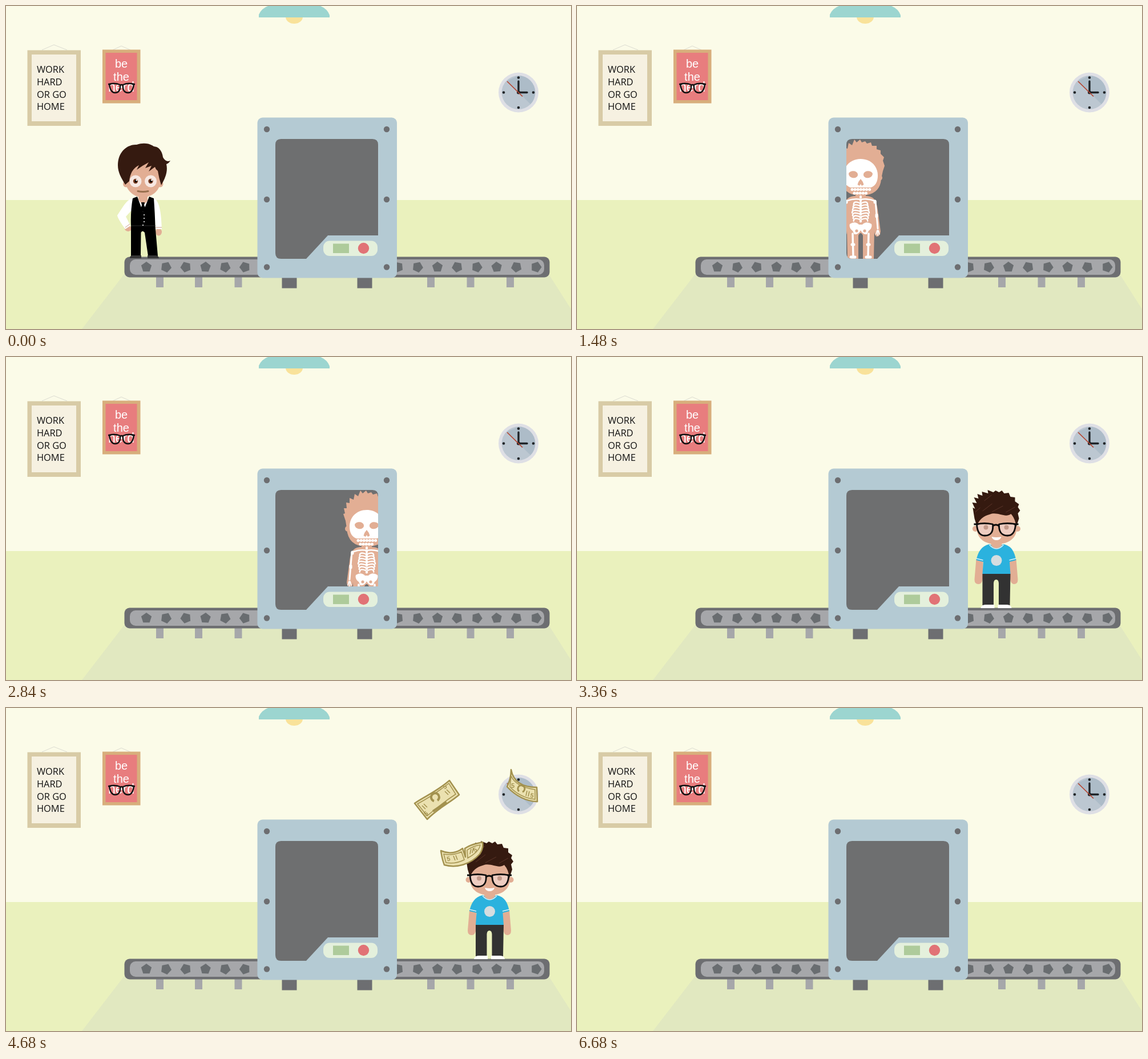
An HTML page that plays this animation: 990x566 px, repeating every 6.72 s.

```html
<!DOCTYPE html>
<html lang="en">
<head>
<meta charset="utf-8">
<title>Makeover machine</title>
<style>
html, body { margin: 0; width: 100%; height: 100%; overflow: hidden; background: #fbfbe8; }
svg { display: block; width: 990px; height: 566px; }
.motto { font: 16.4px "Open Sans", "Noto Sans", sans-serif; fill: #111; }
.nerdy { font: 20px "Liberation Sans", Arial, sans-serif; fill: #fff; text-anchor: middle; }
.skin { fill: #e2ae94; }
.bone { fill: #fff; }
.bones { fill: none; stroke: #fff; stroke-linecap: round; stroke-linejoin: round; }
.hair { fill: #351a10; }
.paper { fill: #ebe1b0; stroke: #a3924f; stroke-width: 2.5; stroke-linejoin: round; }
.ink { fill: none; stroke: #a3924f; stroke-width: 1.5; }
.five { font: bold 11px "Liberation Sans", Arial, sans-serif; fill: #a3924f; text-anchor: middle; }
</style>
</head>
<body>
<svg viewBox="0 0 990 566">
  <defs>
    <path id="pane" d="M482 233H642Q652 233 652 243V402H564L526 443H482Q472 443 472 433V243Q472 233 482 233Z"/>
    <clipPath id="window"><use href="#pane"/></clipPath>
  </defs>

  <!-- room -->
  <rect width="990" height="566" fill="#fbfbe8"/>
  <rect y="340" width="990" height="226" fill="#eaf1bd"/>
  <path d="M207 470H951L990 531V566H133Z" fill="#e1e8c0"/>
  <ellipse cx="505" cy="19" rx="15" ry="12" fill="#f9e29a"/>
  <path d="M443 20V15Q448 4 459 0H551Q563 5 567 16V20Z" fill="#9cd5d0"/>

  <!-- left picture -->
  <path d="M63 77L84 68L107 77" fill="none" stroke="#dcdcd2"/>
  <rect x="37.5" y="77.5" width="93.5" height="132.5" fill="#d8cba6"/>
  <rect x="45" y="85" width="78" height="117" fill="#f6f1e1"/>
  <g class="motto">
    <text x="54" y="117">WORK</text><text x="54" y="139">HARD</text>
    <text x="54" y="160.500">OR GO</text><text x="54" y="182">HOME</text>
  </g>

  <!-- right picture -->
  <path d="M187 77L202 70L218 77" fill="none" stroke="#dcdcd2"/>
  <rect x="169" y="76.500" width="66.500" height="94" fill="#d8ae7c"/>
  <rect x="174.500" y="82" width="55" height="83" fill="#e87d7e"/>
  <g class="nerdy">
    <text x="202" y="108">be</text><text x="202" y="131">the</text>
    <text x="202" y="150" font-size="23" style="font-size:23px">nerd</text>
  </g>
  <g fill="none" stroke="#111" stroke-width="2.4" stroke-linejoin="round">
    <path d="M181 137Q190 134 200 138Q201 152 191 152Q183 152 181 137ZM205 138Q214 134 224 137Q222 152 214 152Q204 152 205 138Z"/>
    <path d="M179 137H184M200 139Q202.500 137 205 139M221 137H226"/>
  </g>

  <!-- clock -->
  <circle cx="898" cy="151.500" r="35" fill="#dedfe5"/>
  <circle cx="898" cy="151.500" r="29.500" fill="#bcc7d1"/>
  <path d="M878 131L919 172A29.500 29.500 0 0 0 898 122Z" fill="#a9b8c6" opacity=".75"/>
  <g fill="#202428">
    <circle cx="898" cy="125.500" r="2.300"/><circle cx="924" cy="151.500" r="2.300"/>
    <circle cx="898" cy="178" r="2.300"/><circle cx="872" cy="151.500" r="2.300"/>
    <circle cx="898" cy="151.500" r="3"/>
  </g>
  <path d="M898 132V151.500H913" fill="none" stroke="#202428" stroke-width="3.400" stroke-linecap="round"/>
  <path d="M878 132L905 158.500" stroke="#b5442f" stroke-width="1.700"/>

  <!-- conveyor -->
  <path d="M263 475h13v18h-13zM331 475h13v18h-13zM400.500 475h13v18h-13zM738 475h13v18h-13zM807.500 475h13v18h-13zM877 475h13v18h-13z" fill="#a6a7aa"/>
  <rect x="207.500" y="439.500" width="745" height="36" rx="9" fill="#6d6e71"/>
  <rect x="217" y="444" width="726" height="27" rx="10" fill="#a6a7aa"/>
  <g id="rollers" fill="#696d70"></g>

  <!-- man in a waistcoat -->
  <g id="man">
    <g class="skin">
      <path d="M232 326H248V343L240 350L232 343Z"/>
      <ellipse cx="214" cy="390" rx="6" ry="5"/><ellipse cx="267.500" cy="396" rx="5.500" ry="6.500"/>
      <circle cx="210.500" cy="312" r="5.500"/><circle cx="270" cy="312" r="5.500"/>
      <path d="M209 290C209 256 271 256 271 290V307C269 325 255 335 240 335C225 335 211 325 209 307Z"/>
    </g>
    <path d="M229 335C213 335 206 351 195 367Q196 373 209 391L218 385L210 369L222 356V384H260V358L262 391H273C272 365 270 336 254 335L240 350Z" fill="#fff"/>
    <path d="M209 388L217 382M262 388H273" stroke="#c9a08d"/>
    <path d="M222 337L230 334L240 361L251 334L259 337Q261 365 261.500 386L266 438H249L243 397Q239 392 236.500 397L236 438H219V385Q218 360 222 337Z"/>
    <path d="M237 344H243L242 349L245 356L240 361L236 356L238 349Z"/>
    <path d="M219 385H262" stroke="#2c2c2c"/>
    <path d="M242 365V379M240 383V385" stroke="#ddd" stroke-width="1.800" stroke-dasharray="2 4"/>
    <path d="M217 442Q217 437 222 437H237V442ZM248 442V437H262Q267 437 268 442Z" fill="#353535"/>
    <path class="hair" d="M209 313C202 301 196 292 196 279C196 255 213 242 229 243C241 239 252 241 259 246C270 247 274 257 275 265C279 272 283 273 288 271Q285 276 281 277C284 290 279 302 272 314Q268 302 266 289Q262 286 261 282L250 290L255 280L244 284L250 274Q240 279 229 287L233 279Q218 286 216 307Z"/>
    <g fill="#f7e8e2"><circle cx="227" cy="307" r="10.500"/><circle cx="253.500" cy="307" r="10.500"/></g>
    <g fill="#743a20"><circle cx="227" cy="307" r="4.200"/><circle cx="253.500" cy="307" r="4.200"/></g>
    <circle cx="227.500" cy="307" r="2"/><circle cx="254" cy="307" r="2"/>
    <g fill="#fff"><circle cx="229" cy="305" r="1.500"/><circle cx="255.500" cy="305" r="1.500"/></g>
    <path d="M231 324.500Q240 326.500 249 324.500" fill="none" stroke="#98704f" stroke-width="3" stroke-linecap="round"/>
  </g>

  <!-- nerd -->
  <g id="nerd">
    <g class="skin">
      <path d="M784 354H796V385Q795 398 788 398Q781 398 781 390ZM842 354H854L857 390Q857 398 850 398Q844 398 843 385Z"/>
      <circle cx="782.500" cy="301" r="5"/><circle cx="856.500" cy="301" r="5"/>
      <path d="M784 280C786 258 852 258 855 280V301C854 320 838 328 819.500 328C801 328 786 320 785 301Z"/>
    </g>
    <path d="M807 328Q819.500 333 832 328C846 331 851 341 854 356L842.500 359L844 380H795L796.500 359L784 356C787 342 793 331 807 328Z" fill="#2bb2de"/>
    <path class="skin" d="M810 322H829V330Q819.500 341 810 330Z"/>
    <path d="M807 329Q819.500 343 832 329M784 353L796 356M842 356L854 353" fill="none" stroke="#d4eff8" stroke-width="1.600"/>
    <circle cx="819.500" cy="356.500" r="9.500" fill="#d5dde0"/>
    <path d="M795 380H844L843 435H823.500V396Q823 390 819 390Q815 390 814.500 396V435H795Z" fill="#323232"/>
    <path d="M792 440Q793 434 800 434H816V440ZM822 440V434H838Q845 434 846 440Z" fill="#fff"/>
    <path class="hair" d="M785 296L781 283L778 264L782 266L777 255L785 256L780 246L788 248L786 240L795 243L794 236L805 239L804 233L814 237L818 234L824 237L829 234L833 239L841 238L844 245L852 246L852 253L859 258L857 263L861 269L857 274L859 283L854 298Q853 284 845 275C834 283 822 270 807 276Q791 280 785 296Z"/>
    <path d="M782 272L791 264M795 270L812 257M812 271L831 261M836 272L852 263M798 252L811 242" stroke="#5b3428" stroke-width="1"/>
    <g fill="#eecdc1" stroke="#0c0c0c" stroke-width="2.800" stroke-linejoin="round">
      <path d="M785 293Q798 290 813 293Q815 313 799 313Q786 313 785 293ZM824 293Q839 290 853 293Q852 313 839 313Q823 313 824 293Z"/>
      <path d="M780 293H788M813 296Q818.500 292 824 296M850 293H858" fill="none"/>
    </g>
    <g fill="#c39a8a"><circle cx="801" cy="298.500" r="4"/><circle cx="837" cy="298.500" r="4"/></g>
    <path d="M811 315Q819.500 317 828 315Q826 321 819.500 321Q813 321 811 315Z" fill="#fff"/>
  </g>

  <!-- machine -->
  <path d="M483.500 470h26v24.500h-26zM615.500 470h26v24.500h-26z" fill="#6d6e71"/>
  <rect x="440.500" y="195.500" width="244.500" height="281" rx="9" fill="#b4cad3"/>
  <use href="#pane" fill="#6e6f70"/>
  <g id="bolts" fill="#6d6e71"></g>
  <rect x="556" y="411.500" width="95" height="26.500" rx="11" fill="#e4f0dc"/>
  <rect x="573" y="416.500" width="28" height="16.500" fill="#aecb9b"/>
  <circle cx="626.500" cy="424.500" r="9.700" fill="#e17376"/>

  <!-- x-ray view -->
  <g clip-path="url(#window)"><g id="xray">
    <g class="skin">
      <path d="M-35 300L-37 287L-41 275L-38 274L-40 265L-35 265L-36 255L-30 256L-30 247L-23 250L-21 240L-15 244L-11 234L-7 239L-1 234L2 239L8 237L11 241L18 239L20 245L28 245L28 251L35 253L35 259L41 265L39 271L42 280L39 289L36 303Q34 332 0 332Q-33 332-35 300Z"/>
      <circle cx="-33" cy="301" r="5"/><circle cx="33" cy="301" r="5"/>
      <path d="M-9 326H9V333C25 333 28 343 30 358L35 395Q34 404 28 404Q24 402 24 394L23 443H4V402Q0 394-4 402V443H-23L-24 394Q-24 402-28 404Q-34 404-35 395L-30 358C-28 343-25 333-9 333Z"/>
    </g>
    <path class="bone" d="M0 268C18 268 30 281 30 297C30 308 26 315 18 318H-18C-26 315-30 308-30 297C-30 281-18 268 0 268Z"/>
    <g class="skin">
      <path d="M-21 294C-20 288-6 287-5 295C-4 303-20 304-21 294ZM21 294C20 288 6 287 5 295C4 303 20 304 21 294Z"/>
      <path d="M0 303Q4 307 5.500 313L2 315L0 312L-2 315L-5.500 313Q-4 307 0 303Z"/>
    </g>
    <g class="bones">
      <path d="M-15 321.500H16M-11 328H12" stroke-width="5" stroke-dasharray=".1 5" />
      <path d="M0 334V380" stroke-width="4" stroke-dasharray="1.500 4.500"/>
      <path d="M0 344V363" stroke-width="3"/>
      <path id="ribs" stroke-width="2.400"/>
      <path d="M-23 341Q-12 337 0 339Q12 337 23 341" stroke-width="2.500"/>
      <path d="M-26 342L-28 366L-30 390M26 342L28 366L30 390" stroke-width="3"/>
      <path d="M-28 366V369M28 366V369M-25 342V344M25 342V344" stroke-width="5"/>
      <path d="M-31 393L-33 400M-30 393V402M-29 393L-27 400M31 393L33 400M30 393V402M29 393L27 400" stroke-width="1.600"/>
      <path d="M-14 399L-13 438M14 399L13 438" stroke-width="3.500"/>
      <path d="M-15 418H-12M12 418H15M-17 440H-10M10 440H17" stroke-width="5"/>
    </g>
    <path class="bone" d="M-3 383Q-10 376-19 382Q-21 389-14 394L-11 400Q-4 401 0 393Q4 401 11 400L14 394Q21 389 19 382Q10 376 3 383Z"/>
    <g class="skin"><circle cx="-7" cy="394" r="2.600"/><circle cx="7" cy="394" r="2.600"/></g>
  </g></g>

  <!-- banknotes -->
  <g id="notes">
    <g>
      <path class="paper" d="M716 167C733 155 754 147 777 127L794 152C778 166 759 174 738 195Z"/>
      <path class="ink" d="M721 168Q749 153 776 132L788 151Q762 168 738 189Z"/>
      <path class="ink" stroke-width="5" style="stroke-width:4" d="M750 163A7 7 0 1 1 756 162M748 181L772 165"/>
      <path class="ink" d="M729 171L735 177M732 168L738 174M769 146L775 152M772 143L778 149"/>
      <text class="five" transform="translate(771 141) rotate(-35)">5</text>
      <text class="five" transform="translate(738 188) rotate(-35)">5</text>
    </g>
    <g>
      <path class="paper" d="M885 108C889 130 906 139 930 139L931 164C912 164 893 154 878 138Q885 124 885 108Z"/>
      <path class="ink" d="M885 119Q893 138 927 143V160Q900 157 883 138Z"/>
      <path class="ink" style="stroke-width:3" d="M899 146A6 6 0 1 1 905 147"/>
      <path class="ink" d="M913 145L911 154M917 146L915 155"/>
      <text class="five" x="888" y="140">5</text>
      <text class="five" transform="translate(921 157) rotate(10)">5</text>
    </g>
    <g>
      <path class="paper" d="M762 250C777 257 791 253 800 246L805 261L804 246C814 239 823 238 835 235Q837 246 830 256C814 274 790 281 768 275Q764 265 762 250Z"/>
      <path class="ink" d="M767 256Q784 259 798 252L803 266Q787 274 771 271ZM808 249Q820 241 831 240Q829 252 809 263Z"/>
      <path class="ink" d="M784 259L787 267M788 258L791 266M815 247L813 256M819 245L817 254"/>
      <text class="five" transform="translate(776 268) rotate(-10)">5</text>
      <text class="five" transform="translate(824 252) rotate(-30)">5</text>
    </g>
  </g>
</svg>
<script>
const LOOP = 6720, STEP = 40;
const $ = id => document.getElementById(id);
const show = (el, on) => el.setAttribute("visibility", on ? "visible" : "hidden");
const place = (el, x, y = 0) => el.setAttribute("transform", `translate(${x} ${y})`);

function pentagon(x, turn) {
  const points = [0, 1, 2, 3, 4].map(k => {
    const a = (turn + k * 72 - 90) * Math.PI / 180;
    return `${x + 9.6 * Math.cos(a)},${457.5 + 9.6 * Math.sin(a)}`;
  });
  return `<polygon points="${points.join(" ")}"/>`;
}

let rollers = "";
for (let i = 0; i < 6; i++) rollers += pentagon(246 + 34.5 * i, i * 25);
for (let i = 0; i < 8; i++) rollers += pentagon(929 - 34.6 * i, 18 + i * 25);
$("rollers").innerHTML = rollers;

$("bolts").innerHTML = [216, 339, 457.5].map(y =>
  [457, 667].map(x => `<circle cx="${x}" cy="${y}" r="5.200"/>`).join("")).join("");

let ribs = "";
for (let i = 0; i < 7; i++) {
  const y = 345 + i * 4.8, w = 15 - Math.abs(i - 3) * 0.9;
  ribs += `M-2 ${y}Q${-w} ${y - 4} ${-w} ${y + 3}M2 ${y}Q${w} ${y - 4} ${w} ${y + 3}`;
}
$("ribs").setAttribute("d", ribs);

// Quick approach, slow scan inside the machine, eased exit.
function beltX(t) {
  if (t < 760) return 240 + 134 * t / 760;
  if (t < 1480) return 374 + 123 * (t - 760) / 720;
  if (t < 2840) return 497 + 135 * (t - 1480) / 1360;
  const p = Math.min(1, (t - 2840) / 1200);
  return 632 + 215 * (1 - (1 - p) ** 1.14);
}

const notes = [...$("notes").children];
const fall = [0.39, 0.34, 0.55];

function draw(t) {
  const x = beltX(t);
  place($("man"), x - 240, -2 * Math.min(1, t / 760));
  place($("nerd"), x - 819);
  place($("xray"), x);
  show($("man"), x < 562);
  show($("nerd"), x >= 562 && t < 6680);
  show($("xray"), x > 420 && x < 710);
  show($("notes"), t >= 4160 && t < 4800);
  notes.forEach((note, i) => place(note, 0, (t - 4680) * fall[i]));
}

const start = performance.now();
function tick() {
  const t = (performance.now() - start) % LOOP;
  draw(Math.floor(t / STEP) * STEP);
  requestAnimationFrame(tick);
}
tick();
</script>
</body>
</html>
```
